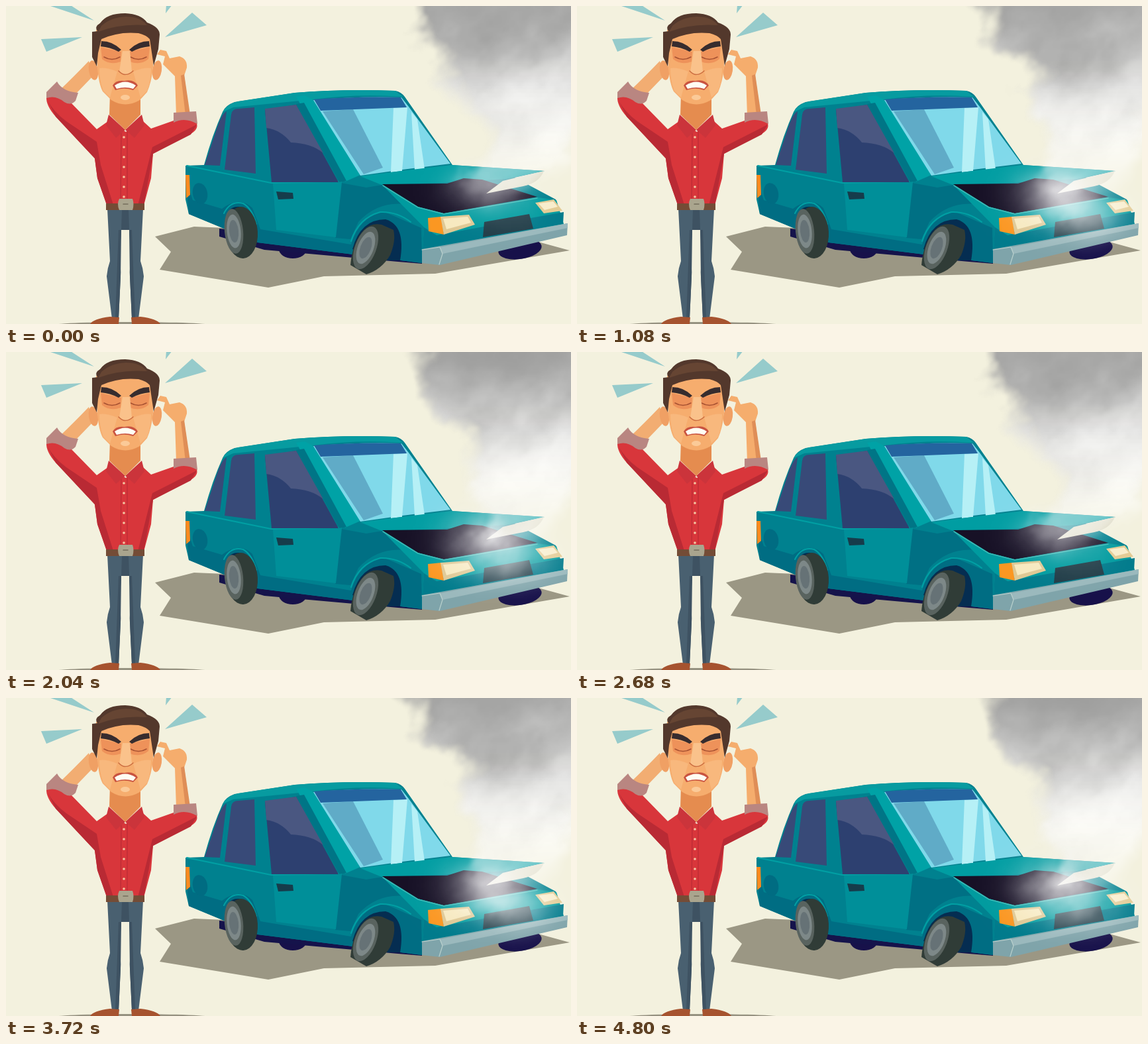
Animation of 853 by 480 pixels, one loop 4840 ms. Source, as an HTML page with a canvas:

```html
<!DOCTYPE html>
<html lang="en">
<head>
<meta charset="utf-8">
<title>Breakdown</title>
<style>
  html, body { margin: 0; width: 100%; height: 100%; overflow: hidden; background: #f3f1de; }
  canvas { display: block; }
</style>
</head>
<body>
<canvas id="stage" width="853" height="480"></canvas>
<script>
const W = 853, H = 480, LOOP = 4840, STEP = 40, CYCLE = 2680;
const stage = document.getElementById('stage').getContext('2d');

function layer(w, h) {
  const c = document.createElement('canvas');
  c.width = w;
  c.height = h;
  return c;
}

const scene = layer(W, H);
const g = scene.getContext('2d');

function fill(color, d) {
  g.fillStyle = color;
  g.fill(new Path2D(d));
}
function line(color, width, d) {
  g.strokeStyle = color;
  g.lineWidth = width;
  g.lineJoin = g.lineCap = 'round';
  g.stroke(new Path2D(d));
}
function oval(color, x, y, rx, ry, turn = 0) {
  g.fillStyle = color;
  g.beginPath();
  g.ellipse(x, y, rx, ry, turn, 0, Math.PI * 2);
  g.fill();
}
// Draws once as given and once flipped around the man's middle, x = 180.
function bothSides(draw) {
  draw();
  g.save();
  g.translate(360, 0);
  g.scale(-1, 1);
  draw();
  g.restore();
}

function drawShadowAndFarWheels() {
  fill('#9b9784', 'M225 348L284 333 800 355 851 369 648 404 480 408 396 425 232 398 249 371Z');
  oval('#17114a', 433, 367, 21, 14);
  oval('#17114a', 776, 367, 33, 15, -.15);
  fill('#15134b', 'M322 336L628 367 628 389 592 386 390 368 322 348Z');
}

function drawBody() {
  fill('#00818f', 'M271 241L299 240Q312 193 327 160 331 150 345 145L436 131Q510 125 588 128 597 130 602 137L674 240 813 249 768 259 830 292 842 330 628 367 628 388 380 357 276 314 271 292Z');
  fill('#006d83', 'M271 260L282 293 326 306Q353 286 372 305L384 337 521 360Q534 316 572 311L627 335 628 388 380 357 276 314Z');
  fill('#007084', 'M506 267L544 274 568 270 627 304Q568 286 532 326L520 352 497 350Z');
  fill('#008f99', 'M403 268L507 266 498 349 408 338Z');
  line('#00a0a4', 2, 'M273 241L400 267 506 265M329 313Q339 293 358 298 371 305 378 329M521 355Q532 320 565 311 590 310 611 326');
  oval('#006c82', 293, 283, 11, 16, -.2);
  fill('#fb8a1f', 'M271 255L277 255 278 285 272 290Z');
  fill('#163c4b', 'M408 280L433 282 434 291 411 292Z');
}

function drawGlass() {
  fill('#079ba0', 'M327 160Q334 148 350 144L436 131Q508 125 588 128L599 137Q530 132 464 141L343 153Z');
  fill('#00a2a6', 'M438 137L451 135 468 144 535 255 512 265Z');
  fill('#007586', 'M438 148L450 146 514 264 503 266Z');
  fill('#384a78', 'M300 240L316 192Q325 163 333 159L323 241ZM330 247L340 164Q341 155 351 155L375 153 377 253Z');
  fill('#2d4070', 'M391 157L438 149 502 266 401 266Z');
  fill('#4a5781', 'M391 155L438 149 479 222Q461 207 430 206 415 187 393 184Z');
  fill('#80d9ea', 'M464 142Q530 136 597 138L608 152 671 238Q602 246 535 256Z');
  fill('#60abc7', 'M478 159L524 156 569 244 540 254Z');
  fill('#b6f0f6', 'M585 154L606 153 598 249 581 251ZM612 160L621 171 632 246 617 248Z');
  fill('#24649f', 'M465 141Q530 136 596 138L605 153 475 158Z');
}

function drawFront() {
  fill('#009da2', 'M535 257Q610 247 673 240L813 249 755 261 657 267 567 270Z');
  fill('#171126', 'M568 269L666 268 691 260 719 262 802 288 661 313 622 303Z');
  fill('#e0ddc8', 'M725 283L750 264 812 249Q805 267 781 272Z');
  fill('#009b9f', 'M568 270L622 303 661 313 803 289 831 293 842 329 655 365 629 367 631 334Z');
  fill('#007b8c', 'M631 334L650 346 842 311 841 329 629 367Z');
  line('#3bb9b4', 1.5, 'M569 271L622 304 661 314 802 290');
  fill('#213d48', 'M722 326L790 314 796 336 720 349Z');
  fill('#fb9722', 'M637 320L657 318 661 345 638 340Z');
  fill('#dfc894', 'M656 318L699 315 708 330 661 345Z');
  fill('#f7e9bf', 'M660 321L697 318 702 327 665 337Z');
  fill('#e3cb94', 'M799 297L827 292 840 309 812 313Z');
  fill('#f8edcb', 'M804 298L826 295 833 303 813 308Z');
  fill('#7fa4aa', 'M628 367L848 328 847 346 655 391 628 388Z');
  fill('#9bb9bd', 'M655 364L848 328 848 335 659 374Z');
  line('#b9d0cd', 1.2, 'M628 368L655 364 659 374 654 390');
}

function hub(x, y, rx, ry, turn) {
  ['#59635f', '#7d8888', '#667276'].forEach((c, i) => oval(c, x, y, rx * (1 - i * .25), ry * (1 - i * .25), turn));
}

function drawWheels() {
  fill('#052c50', 'M330 336Q330 302 351 303 372 306 379 343L368 359Z');
  oval('#303c37', 356, 342, 24, 39, -.06);
  hub(344, 340, 14, 34, -.1);
  fill('#052d51', 'M523 367Q535 322 573 322 604 331 595 384L564 384Z');
  fill('#303c37', 'M520 391Q523 357 540 338 551 327 567 330L585 338Q589 354 580 376 567 398 544 405Z');
  hub(543, 365, 16, 34, .36);
}

function drawRays() {
  fill('#96cbcb', 'M64 -1L93 -4 133 22ZM53 50L115 47 61 69ZM242 -2L251 -2 241 11ZM281 10L303 29 240 47Z');
}

function drawHead() {
  bothSides(() => oval('#f0a064', 132, 97, 7, 15, -.15));
  fill('#e58c4f', 'M157 132L203 132 203 164 180 187 156 164Z');
  fill('#f6ad6e', 'M136 36L138 93Q140 118 146 129L159 142Q180 155 202 142L213 130Q220 114 222 92L224 36Z');
  bothSides(() => {
    fill('#f8b87d', 'M141 94Q150 92 168 99L157 138 147 128Q141 112 141 94Z');
    fill('#ee925a', 'M143 62L174 69 173 84Q157 90 145 80Z');
    line('#a85333', 1.6, 'M148 77Q160 84 172 77');
    fill('#372c2e', 'M144 53Q161 53 174 66L170 69Q157 62 143 61Z');
  });
  fill('#fac28b', 'M176 68L187 68 190 99 181 105 171 99Z');
  line('#cb6d40', 1.5, 'M170 98Q180 109 192 98');
  fill('#c95340', 'M161 120Q166 111 179 113 193 110 199 120L192 127Q179 122 165 127Z');
  fill('#fffdf3', 'M164 120Q180 109 196 120L192 125Q180 121 167 125Z');
  oval('#fbca98', 180, 138, 7, 4);
  fill('#53382c', 'M137 91L130 77 130 39 138 38Q133 31 142 26 152 11 180 11 204 12 213 25 232 32 232 43L230 65 223 90 217 50Q212 44 200 41 170 38 144 50L139 71Z');
  fill('#664533', 'M144 30Q158 17 181 16 203 16 213 29 171 26 139 39Z');
}

function drawArms() {
  fill('#f2ad72', 'M82 126Q101 108 125 83L132 105 105 133Z');
  fill('#f5ad6d', 'M228 73L233 66 242 68 247 79 262 76Q274 80 273 93L269 105 277 164 257 166 255 106 237 88 240 76Z');
  fill('#df8e57', 'M264 105L269 103 278 164 271 165Z');
}

function drawShirt() {
  fill('#d8363b', 'M61 137Q78 125 99 147L137 186 154 174 181 190 207 174 219 185 256 172Q272 168 288 177 291 187 277 194L222 223 219 260 208 301 152 300 138 260 134 230 75 167Q60 150 61 137Z');
  fill('#b92a34', 'M63 143Q72 160 91 174L137 205 143 240 162 300 152 300 138 260 134 230 75 167ZM288 179L221 213 199 301 208 301 222 223 279 194Z');
  line('#bd2d36', 1.3, 'M174 190L173 299M183 190L183 299');
  bothSides(() => fill('#cb343b', 'M155 164L180 187 166 199 151 180Z'));
  fill('#b98681', 'M61 130L77 114Q85 129 109 131L105 143Q98 151 88 145 75 134 61 139ZM253 161L287 159 289 178Q270 167 253 176Z');
  for (let y = 198; y < 295; y += 15) oval('#f3c9a4', 178, y, 1.8, 1.8);
}

function drawLegs() {
  bothSides(() => {
    fill('#496070', 'M153 306L181 306 181 338 174 338 171 385Q174 396 173 408L170 472 160 472 152 408Q153 396 157 385Z');
    fill('#3e5262', 'M175 308L181 308 181 338 174 338ZM170 338L174 338 173 408 170 472 165 472Z');
    fill('#a6532f', 'M127 480Q132 472 157 469L171 470 170 480Z');
  });
  fill('#744c36', 'M151 298H209V308H151Z');
  fill('#aaa58e', 'M171 291H191Q194 299 191 308H171Q167 299 171 291Z');
  line('#746d5c', 1.5, 'M177 299H184');
}

// Smoke: noise that scrolls upwards and wraps once per cycle.
const SX = 560, CELL = 2, SW = 147, SH = 200;
const smoke = layer(SW, SH);
const sctx = smoke.getContext('2d');
const pixels = sctx.createImageData(SW, SH);

let seed = 41;
const lattice = Float32Array.from({ length: 4096 }, () => {
  seed = (seed * 1664525 + 1013904223) % 4294967296;
  return seed / 4294967296;
});
const clamp = v => Math.max(0, Math.min(1, v));
const ease = v => { v = clamp(v); return v * v * (3 - 2 * v); };
const mix = (a, b, k) => a + (b - a) * k;

function noise(x, y, wrap, salt) {
  const ix = Math.floor(x), iy = Math.floor(y);
  const kx = ease(x - ix), ky = ease(y - iy);
  const at = (i, j) => lattice[(i * 57 + ((j % wrap) + wrap) % wrap * 131 + salt) & 4095];
  return mix(mix(at(ix, iy), at(ix + 1, iy), kx), mix(at(ix, iy + 1), at(ix + 1, iy + 1), kx), ky);
}

function turbulence(x, y, phase) {
  let sum = 0;
  for (let o = 0, n = 1; o < 4; o++, n *= 2)
    sum += (noise(x / 67 * n, (y / 67 + phase * 4) * n, 4 * n, o * 977) - .5) / n;
  return sum;
}

const blob = (x, y, cx, cy, rx, ry) => Math.exp(-(((x - cx) / rx) ** 2) - ((y - cy) / ry) ** 2);
const wave = (phase, peak) => Math.cos(Math.PI * 2 * (phase - peak));

// The plume leans right, thins towards the hood and darkens towards the top.
const leftEdge = y => mix(612, 695, ease(y / 190));
const rightEdge = y => 930 - 130 * (y / 300) ** 2;
const cover = y => .95 * clamp(1 - (y / 285) ** 4);
const tone = y => mix(160, 253, 1 - Math.exp(-((Math.max(0, y) / 130) ** 2)));

function drawSmoke(ms) {
  const phase = ms % CYCLE / CYCLE;
  const puffing = .6 + .4 * wave(phase, .66);
  const spilling = .34 + .31 * wave(phase, .55);
  const data = pixels.data;
  for (let j = 0, k = 0; j < SH; j++) {
    const y = j * CELL;
    const left = leftEdge(y), right = rightEdge(y), density = cover(y);
    for (let i = 0; i < SW; i++, k += 4) {
      const x = SX + i * CELL;
      const n = turbulence(x + y * .25, y, phase);
      const plume = density * ease((x - left + n * 65 + 14) / 46) * ease((right - x + n * 65) / 60);
      const puff = clamp(puffing * (1.05 + n * .6) * blob(x, y, 727, 274, 55, 32));
      const spill = clamp(spilling * (1 + n * .7) * blob(x, y, 752, 314, 64, 34));
      data[k] = data[k + 1] = data[k + 2] = tone(y + n * 42) + n * 10;
      data[k + 3] = 255 * (1 - (1 - plume) * (1 - puff) * (1 - spill));
    }
  }
  sctx.putImageData(pixels, 0, 0);
  stage.drawImage(smoke, SX, 0, SW * CELL, SH * CELL);
}

g.fillStyle = '#f3f1de';
g.fillRect(0, 0, W, H);
drawShadowAndFarWheels();
drawBody();
drawGlass();
drawFront();
drawWheels();
oval('#969281', 190, 482, 121, 5);
drawRays();
drawArms();
drawShirt();
drawLegs();
drawHead();

let start, shown = -1;
function tick(now) {
  start ??= now;
  const ms = Math.floor((now - start) % LOOP / STEP) * STEP;
  if (ms !== shown) {
    shown = ms;
    stage.drawImage(scene, 0, 0);
    drawSmoke(ms);
  }
  requestAnimationFrame(tick);
}
requestAnimationFrame(tick);
</script>
</body>
</html>
```
